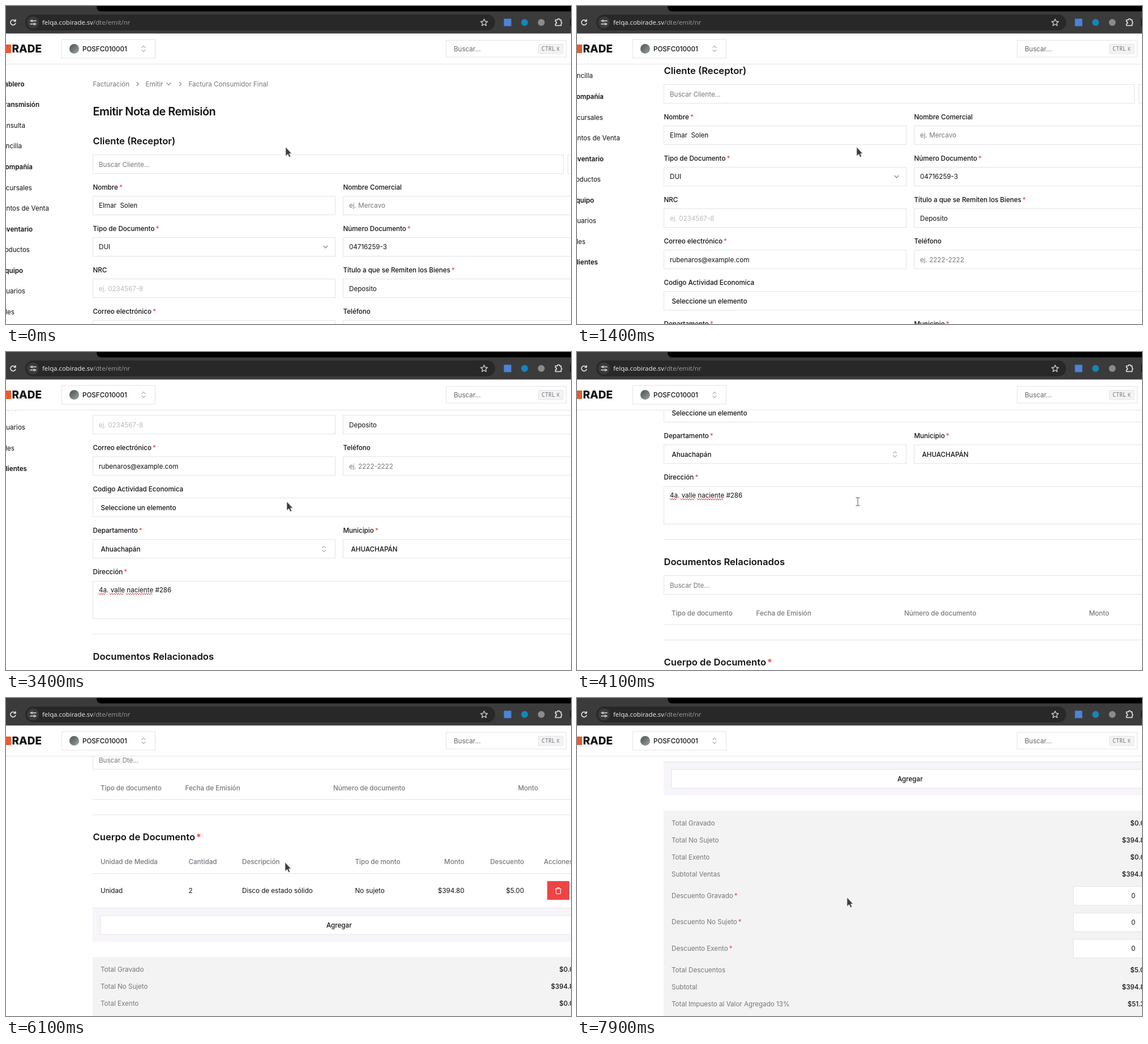
These frames come from a looping animation (998x561 px, 8000 ms). An HTML page:

```html
<!DOCTYPE html>
<html lang="es">
<head>
<meta charset="utf-8">
<title>Emitir Nota de Remisión</title>
<style>
  html, body { margin: 0; width: 100%; height: 100%; overflow: hidden; background: #fff; }
  svg { display: block; width: 998px; height: 561px; }
  text { font-family: Inter, sans-serif; white-space: pre; }
  .icon { fill: none; stroke-linecap: round; stroke-linejoin: round; }
</style>
</head>
<body>
<svg id="stage" viewBox="0 0 998 561"></svg>
<script>
const INK = '#111113', GRAY = '#77777f', LINE = '#e4e4e7', RED = '#ef4444';
const BASE = 11.62, RIGHT = 1040, ROW = 73.05;

// y is the middle of the capitals
function text(x, y, str, { fill = INK, size = BASE, weight = 400, anchor = 'start', extra = '' } = {}) {
  const star = str.endsWith('*');
  const body = star ? `${str.slice(0, -1)}<tspan dx="2" fill="${RED}">*</tspan>` : str;
  return `<text x="${x}" y="${y + size * 0.363}" font-size="${size}" font-weight="${weight}" fill="${fill}" text-anchor="${anchor}" ${extra}>${body}</text>`;
}
const rect = (x, y, w, h, fill, extra = '') =>
  `<rect x="${x}" y="${y}" width="${w}" height="${h}" fill="${fill}" ${extra}/>`;
const box = (x, y, w, h = 33) => rect(x, y, w, h, '#fff', `stroke="${LINE}"`);
const rule = (y, x = 153) => rect(x, y - 0.5, RIGHT - x, 1, LINE);
const icon = (d, x, y, color = GRAY, width = 1.2) =>
  `<path class="icon" d="${d}" transform="translate(${x} ${y})" stroke="${color}" stroke-width="${width}"/>`;

const DOWN = 'M-3.5 -1.8L0 1.8L3.5 -1.8', NEXT = 'M-1.6 -3L1.6 0L-1.6 3';
const UPDOWN = 'M-3 -2L0 -5L3 -2M-3 2L0 5L3 2';
const TRASH = 'M-5 -3.5H5M-4 -3.5V4Q-4 5.5 -2.5 5.5H2.5Q4 5.5 4 4V-3.5M-2 -3.5V-5.5H2V-3.5';
const hint = { fill: GRAY }, medium = { weight: 500 }, head = { fill: GRAY, weight: 500 };
const right = { anchor: 'end' };
const title = (y, str) => text(153.5, y, str, { size: 16.6, weight: 600 });

function field(col, row, label, value, style = {}, pad = 10.5) {
  const x = col ? 595.5 : 153.5, y = 319.5 + row * ROW;
  const wide = col || row === 4;
  return text(x, y, label, medium) + box(x, y + 16, wide ? RIGHT - x : 428) +
    text(x + pad, y + 32.7, value, style);
}

function squiggle(x, end, y) {
  let d = `M${x} ${y}`;
  for (let i = 1; x + i * 2 <= end; i++) d += `L${x + i * 2} ${y + (i % 2 ? 2.6 : 0)}`;
  return icon(d, 0, 0, '#e03c3c', 1);
}

function sidebar() {
  const items = [['Tablero', 32.5, 1], ['Transmisión', 59, 1], ['Consulta', 34], ['Sencilla', 28],
    ['Compañía', 47, 1], ['Sucursales', 46], ['Puntos de Venta', 76], ['Inventario', 47, 1],
    ['Productos', 42], ['Equipo', 30, 1], ['Usuarios', 34], ['Roles', 15], ['Clientes', 37, 1]];
  return items.map(([name, end, bold], i) =>
    text(end, 137.6 + i * 36.55, name, { anchor: 'end', weight: bold ? 600 : 400 })).join('');
}

function clientForm() {
  return text(153.5, 137.6, 'Facturación', hint) + icon(NEXT, 232.5, 137.6) +
    text(246.5, 137.6, 'Emitir', hint) + icon(DOWN, 287.5, 137.6) + icon(NEXT, 308, 137.6) +
    text(322.5, 137.6, 'Factura Consumidor Final', hint) +
    text(153.5, 185.5, 'Emitir Nota de Remisión', { size: 19.9, weight: 600, extra: 'letter-spacing="-.5"' }) +
    title(237.5, 'Cliente (Receptor)') +
    box(153.5, 262.5, 831) + box(992.5, 262.5, 40) + text(164, 279.6, 'Buscar Cliente...', hint) +
    field(0, 0, 'Nombre*', 'Elmar  Solen') + field(1, 0, 'Nombre Comercial', 'ej. Mercavo', hint) +
    field(0, 1, 'Tipo de Documento*', 'DUI') + icon(DOWN, 564.5, 425) +
    field(1, 1, 'Número Documento*', '04716259-3') +
    field(0, 2, 'NRC', 'ej. 0234567-8', { fill: '#bbbbbf' }) +
    field(1, 2, 'Título a que se Remiten los Bienes*', 'Deposito') +
    field(0, 3, 'Correo electrónico*', 'rubenaros@example.com') +
    field(1, 3, 'Teléfono', 'ej. 2222-2222', hint) +
    field(0, 4, 'Codigo Actividad Economica', 'Seleccione un elemento', medium, 14) +
    field(0, 5, 'Departamento*', 'Ahuachapán', medium, 14) + icon(UPDOWN, 561.5, 717.5, GRAY, 1) +
    field(1, 5, 'Municipio*', 'AHUACHAPÁN', medium, 14) +
    text(153.5, 758, 'Dirección*', medium) + box(153.5, 774.5, RIGHT, 66) +
    text(164, 790, '4a. valle naciente #286') +
    [[164, 176], [183, 207], [212, 259]].map(([a, b]) => squiggle(a, b, 795.5)).join('');
}

function related() {
  return rule(867.5) + title(906.5, 'Documentos Relacionados') +
    box(153.5, 931.5, RIGHT) + text(164, 948.6, 'Buscar Dte...', hint) +
    text(167, 997.6, 'Tipo de documento', head) + text(316.5, 997.6, 'Fecha de Emisión', head) +
    text(578, 997.6, 'Número de documento', head) + text(904.5, 997.6, 'Monto', head) +
    rule(1018) + rule(1045);
}

function items() {
  const h = 1128, r = 1178.6;
  return title(1084, 'Cuerpo de Documento*') +
    text(167, h, 'Unidad de Medida', head) + text(322.5, h, 'Cantidad', head) +
    text(417, h, 'Descripción', head) + text(616.5, h, 'Tipo de monto', head) +
    text(809.5, h, 'Monto', { ...head, ...right }) + text(915, h, 'Descuento', { ...head, ...right }) +
    text(950, h, 'Acciones', head) + rule(1148.5) +
    text(167, r, 'Unidad') + text(322.5, r, '2') + text(417, r, 'Disco de estado sólido') +
    text(616.5, r, 'No sujeto') + text(809.5, r, '$394.80', right) + text(915, r, '$5.00', right) +
    rect(956, 1162, 39, 33, RED) + icon(TRASH, 975.5, 1179, '#fff', 1.1) +
    rect(153, 1209, RIGHT, 60, '#f7f5fa') + rule(1209.5) +
    box(167, 1223, RIGHT) + text(588.3, 1239.6, 'Agregar', { weight: 500, anchor: 'middle' });
}

function totals() {
  const rows = [[1317.6, 'Total Gravado', '$0.00', 977.3], [1347.5, 'Total No Sujeto', '$394.80', 962.5],
    [1377.5, 'Total Exento', '$0.00', 977.3], [1407.3, 'Subtotal Ventas', '$394.80', 962.5],
    [1445.7, 'Descuento Gravado*'], [1492.1, 'Descuento No Sujeto*'], [1538.6, 'Descuento Exento*'],
    [1576.7, 'Total Descuentos', '$5.00', 977.3], [1606.6, 'Subtotal', '$394.80', 962.5],
    [1636.5, 'Total Impuesto al Valor Agregado 13%', '$51.32', 972.5]];
  return rect(153, 1296, RIGHT, 420, '#f3f3f3') + rows.map(([y, label, value, x]) =>
    text(167, y, label, hint) + (value ? text(x, y, value, medium)
      : box(877, y - 16, 180) + text(979, y + 0.5, '0'))).join('');
}

function header() {
  return rect(0, 48, 998, 54, '#fff') + rule(102.5, 0) +
    rect(0, 68, 9, 15, '#ea5a2c') + text(10.5, 75.6, 'RADE', { size: 19, weight: 800 }) +
    box(98.5, 59, 165) + '<circle cx="120.5" cy="75.5" r="8.5" fill="url(#dot)"/>' +
    text(135, 75.6, 'POSFC010001', medium) + icon(UPDOWN, 243, 75.5, GRAY, 1) +
    box(777.5, 60.5, 212, 29.5) + text(791, 75.6, 'Buscar...', { fill: '#66666e' }) +
    rect(940.5, 67.5, 43.5, 16.5, '#f3f3f4', `stroke="${LINE}" rx="1"`) +
    text(946, 75.6, 'CTRL<tspan dx="3" font-size="8.3">K</tspan>',
      { size: 10, fill: GRAY, extra: 'style="font-family:\'Noto Sans Mono\',monospace"' });
}

function browserBar() {
  const light = '#e8e8e8';
  return rect(0, 0, 998, 48.5, '#3b3b3b') + '<path d="M160 0H998V9.5H168Q160 9.5 160 0Z" fill="#000"/>' +
    rect(34, 15, 830, 28, '#282828', 'rx="14"') + '<circle cx="47.5" cy="29" r="10.5" fill="#3b3b3b"/>' +
    icon('M3.5 -3A4.6 4.6 0 1 0 4.4 1.5M4.4 -5V-2H1.4', 12.5, 29, light, 1.6) +
    icon('M-5 -2.7H-3.4M1 -2.7H5M-5 2.7H-1M3.4 2.7H5', 48, 29, light, 1.5) +
    icon('M-2 -4.2A1.5 1.5 0 1 0 -2 -1.2A1.5 1.5 0 1 0 -2 -4.2M2 1.2A1.5 1.5 0 1 0 2 4.2A1.5 1.5 0 1 0 2 1.2', 48, 29, light) +
    text(64, 29, 'felqa.cobirade.sv<tspan fill="#a0a0a0">/dte/emit/nr</tspan>',
      { size: 11.4, fill: '#f0f0f0', extra: 'style="font-family:\'Open Sans\',sans-serif"' }) +
    icon('M0 -6L1.8 -2L6 -1.6L2.8 1.3L3.8 5.6L0 3.3L-3.8 5.6L-2.8 1.3L-6 -1.6L-1.8 -2Z', 844.5, 29, '#d0d0d0', 1.3) +
    rect(879.5, 22.5, 13, 13, '#4b83dc') + '<circle cx="916" cy="29" r="6" fill="#1686b8"/>' +
    '<circle cx="945.5" cy="29" r="6" fill="#8b8b8b"/>' +
    icon('M-5.5 -4H-2A2 2 0 0 1 2 -4H4.5V-.5A2 2 0 0 1 4.5 3.2V6H-5.5V3A2 2 0 0 0 -5.5 -1Z', 976, 28.5, light, 1.6) +
    rect(996.5, 22, 1.5, 13, '#111');
}

const stage = document.getElementById('stage');
stage.innerHTML = `<defs><linearGradient id="dot" x2="1" y2="1">
    <stop stop-color="#4a5654"/><stop offset=".5" stop-color="#717977"/><stop offset="1" stop-color="#a5a5a5"/>
  </linearGradient></defs>
  <g id="page">${sidebar()}${clientForm()}${related()}${items()}${totals()}</g>
  ${header()}${browserBar()}
  <g id="pointer">
    <path id="arrow" d="M0 0V15.5L3.7 12.3L6.2 17.5L8.7 16.3L6.3 11.3H10.5Z" fill="#3c3c3c" stroke="#d8d8d8" stroke-width=".8"/>
    <path id="beam" class="icon" d="M-3 -7H3M0 -7V7M-3 7H3" stroke="#85858a" stroke-width="1.4"/>
  </g>`;

// time, scroll, pointer x, pointer y
const path = [[0, 0, 494, 249], [300, 0, 494, 249], [1400, 123.6, 494, 249], [2200, 299, 494, 249],
  [2500, 299, 494, 249], [2900, 299, 496, 264], [3100, 299, 496, 264], [4100, 537, 496, 264],
  [5000, 697.3, 496, 284], [6100, 838.5, 493, 290], [7900, 1097, 477, 352]];
// vertical spans of editable fields below the pointer
const inputs = [[262, 296], [335, 369], [554, 588], [774, 841], [931, 965]];
const [page, pointer, arrow, beam] = ['page', 'pointer', 'arrow', 'beam'].map(id => document.getElementById(id));

function pose(t) {
  const i = Math.max(1, path.findIndex(p => p[0] >= t));
  const a = path[i - 1], b = path[i], k = (t - a[0]) / (b[0] - a[0]);
  return [1, 2, 3].map(n => a[n] + (b[n] - a[n]) * k);
}

function draw(now) {
  const t = Math.floor(now % 8000 / 100) * 100;
  const [scroll, x, y] = pose(t);
  const typing = inputs.some(([top, end]) => y + scroll >= top && y + scroll <= end);
  page.setAttribute('transform', `translate(0 ${-Math.round(scroll)})`);
  pointer.setAttribute('transform', `translate(${x} ${y})`);
  arrow.style.display = typing ? 'none' : '';
  beam.style.display = typing ? '' : 'none';
  requestAnimationFrame(draw);
}
draw(performance.now());
</script>
</body>
</html>
```
